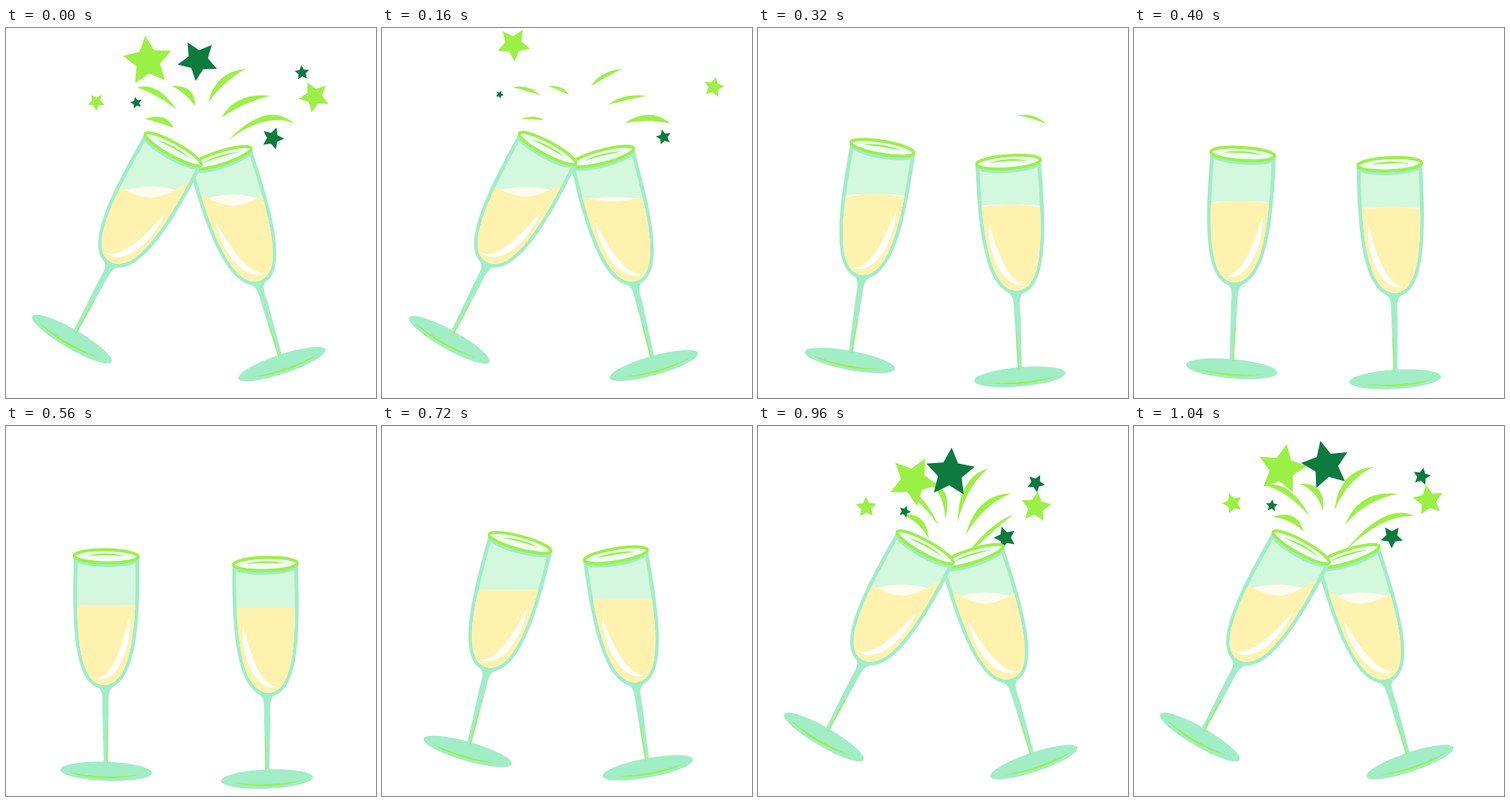
An HTML page with a canvas that plays this animation: 480x480 px, repeating every 1120 ms.

```html
<!DOCTYPE html>
<html>
<head>
<meta charset="utf-8">
<style>
html, body { margin: 0; width: 100%; height: 100%; overflow: hidden; background: #fff; }
canvas { display: block; }
</style>
</head>
<body>
<canvas id="stage" width="480" height="480"></canvas>
<script>
const ctx = document.getElementById('stage').getContext('2d');
// One cycle runs from rest, through the clink and the hold, back to rest
const LOOP = 1120, STEP = 80, REST = 560, CLINK = 800, PART = 1120;
const LIME = '#9bf045', DARK = '#0d7a3e', MINT = '#a0edc6', PALE = '#d4f8de',
  WINE = '#fff2ae', FOAM = '#fffbee', INSIDE = '#effff8';

const mix = (a, b, k) => a + (b - a) * k;
const clamp = v => Math.max(0, Math.min(1, v));
const rad = deg => deg * Math.PI / 180;
const fill = (color, path) => { ctx.fillStyle = color; ctx.fill(new Path2D(path)); };

// rest and clink: foot x, foot y, angle; half and power shape the swing back
const glasses = [
  { side: -1, rest: [338.5, 458, -.4], clink: [358, 436, -16.6], level: 222, half: .4, power: 4.6 },
  { side: 1, rest: [130, 448, 0], clink: [85.5, 403.5, 28.1], level: 216, half: .5, power: 6 }
];

// Place and angle at the moment of parting; fast stars start farther out and vanish first
const stars = [
  { color: LIME, x: 184, y: 43, r: 33, angle: -6 },
  { color: DARK, x: 249, y: 42, r: 33, angle: -30, fast: true },
  { color: LIME, x: 117, y: 96, r: 14, angle: -35, fast: true },
  { color: DARK, x: 169, y: 97, r: 8, angle: -12 },
  { color: DARK, x: 384, y: 58, r: 12, angle: -5, fast: true },
  { color: LIME, x: 400, y: 89, r: 20.5, angle: -26 },
  { color: DARK, x: 346, y: 143, r: 15, angle: 20 }
];

// Inner end, bend, outer end
const streaks = [
  { x: [228, 201, 170], y: [117, 69, 77] },
  { x: [245, 250, 215], y: [111, 73, 75] },
  { x: [220, 212, 180], y: [137, 107, 118] },
  { x: [260, 266, 311], y: [110, 57, 53] },
  { x: [274, 292, 343], y: [128, 82, 88] },
  { x: [288, 339, 374], y: [146, 93, 124], delay: 80 }
];

function drawStar({ color, x, y, r, angle, fast }, t) {
  const left = clamp(((fast ? 1280 : 1400) - t) / 280);
  const size = r * (1 - (1 - left) ** 2);
  const start = fast ? .4 : .1;
  const out = start + (1 - start) * Math.sqrt((t - CLINK) / (PART - CLINK));
  const turn = angle - .21 * (t - PART);
  ctx.fillStyle = color;
  ctx.beginPath();
  for (let i = 0; i < 10; i++) {
    const a = rad(turn + i * 36 - 90), d = i % 2 ? size * .49 : size;
    ctx.lineTo(mix(250, x, out) + d * Math.cos(a), mix(150, y, out) + d * Math.sin(a));
  }
  ctx.fill();
}

// A crescent over the part of the curve between tail and head
function drawStreak({ x, y, delay = 0 }, time) {
  const t = time - delay;
  const tail = (t - 1040) / 600, head = Math.min(1, .05 + (t - CLINK) / 200);
  const thick = 8 * clamp((1440 - t) / 160);
  if (!thick) return;
  const at = (a, b) => [x, y].map(p => mix(mix(p[0], p[1], a), mix(p[1], p[2], a), b));
  const from = at(tail, tail), bend = at(tail, head), to = at(head, head);
  const mid = from.map((v, i) => (v + to[i]) / 2);
  const depth = Math.hypot(mid[0] - bend[0], mid[1] - bend[1]);
  const inner = bend.map((v, i) => mix(v, mid[i], Math.min(.9, 2 * thick / depth)));
  fill(LIME, `M${from}Q${bend} ${to}Q${inner} ${from}`);
}

// 0 at rest, 1 when the rims touch
function swing({ half, power }, t) {
  if (t < PART) return clamp((t - REST) / (CLINK - REST)) ** 1.7;
  return 1 / (1 + ((t - PART) / LOOP * 2 / half) ** power);
}

const bowl = d => `M${d - 42} -277C${d - 44} -200 ${d - 45} ${-108 - d} -3 ${-107 - d}` +
  `C${41 - d} ${-108 - d} ${44 - d} -200 ${43 - d} -277Z`;

function drawWine(color, cx, surface) {
  ctx.fillStyle = color;
  ctx.beginPath();
  for (let u = -.2; u <= 1.21; u += .05) ctx.lineTo(cx + (u - .5) * 90, surface(Math.sin(Math.PI * u)));
  ctx.lineTo(cx + 160, 480);
  ctx.lineTo(cx - 160, 480);
  ctx.fill();
}

function oval(y, rx, ry, tilt) {
  ctx.beginPath();
  ctx.ellipse(0, y, rx, ry, rad(tilt), 0, 2 * Math.PI);
}

function drawGlass(glass, t) {
  const { side, rest, clink, level } = glass;
  const w = swing(glass, t), bow = 14 * w * (1 - w);
  const [fx, fy, angle] = rest.map((v, i) => mix(v, clink[i], w));
  const x = fx + side * bow, y = fy - bow, a = rad(angle);
  ctx.save();
  ctx.translate(x, y);
  ctx.rotate(a);
  ctx.scale(side, 1);

  // Foot and stem
  ctx.fillStyle = MINT;
  oval(0, 59.5, 12.5, 2);
  ctx.fill();
  fill(LIME, 'M-50 1Q-5 15 42 5Q-5 10 -50 1');
  fill(MINT, 'M-13 -111C-3 -105 -5 -95 -5 -80L-3 -5L2 -5L3 -80C3 -95 2 -105 9 -110Z');
  fill(LIME, 'M1 -56L2.2 -54L1.8 -10L.6 -9Z');

  // Bowl, with the wine kept level on the stage
  fill(MINT, bowl(0));
  fill(PALE, bowl(5));
  ctx.save();
  ctx.clip(new Path2D(bowl(5)));
  ctx.resetTransform();
  const cx = x + level * Math.sin(a), top = y - level * Math.cos(a);
  const sag = 18 * w * (3 * w - 2) * clamp((t - CLINK) / 160);
  drawWine(FOAM, cx, s => top - .4 * Math.abs(sag) * s);
  drawWine(WINE, cx, s => top + sag * (s - .6));
  ctx.restore();
  fill('#fff', 'M30 -198C33 -160 15 -114 -14 -119C8 -123 20 -160 29 -198');

  // Rim
  ctx.fillStyle = MINT;
  oval(-275, 42.5, 10, 1);
  ctx.fill();
  ctx.fillStyle = INSIDE;
  ctx.strokeStyle = LIME;
  ctx.lineWidth = 4;
  oval(-279, 41.5, 8.5, 1);
  ctx.fill();
  ctx.stroke();
  fill(LIME, 'M-26 -279.5Q0 -286 26 -279Q0 -281 -26 -279.5');
  ctx.restore();
}

function frame(now) {
  const step = Math.floor(now % LOOP / STEP) * STEP;
  const t = step < REST ? step + LOOP : step;
  ctx.fillStyle = '#fff';
  ctx.fillRect(0, 0, 480, 480);
  if (t >= CLINK) {
    streaks.forEach(s => drawStreak(s, t));
    stars.forEach(s => drawStar(s, t));
  }
  glasses.forEach(g => drawGlass(g, t));
}

const begin = performance.now();
(function tick() {
  frame(performance.now() - begin);
  requestAnimationFrame(tick);
})();
</script>
</body>
</html>
```
